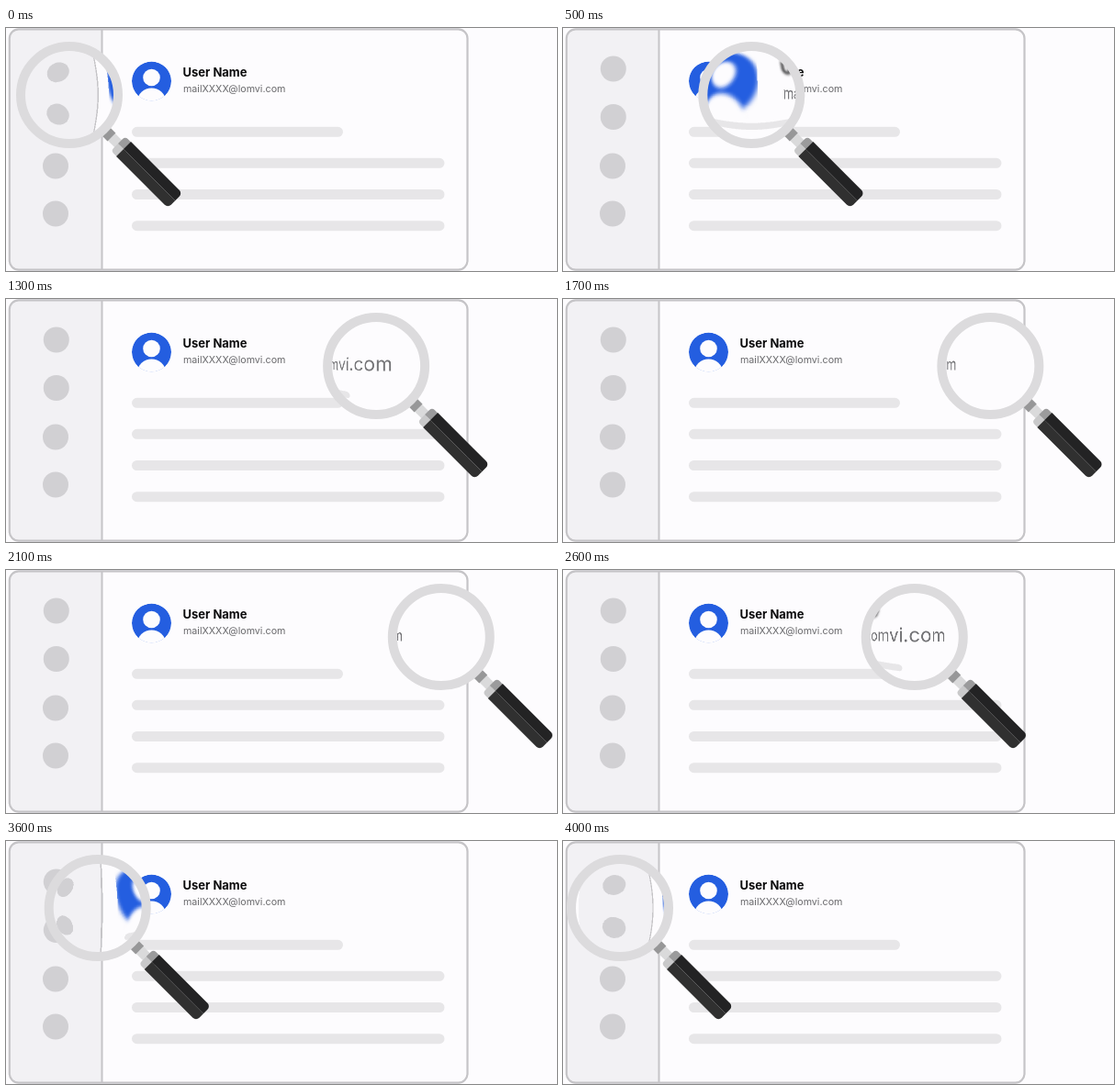
An HTML page with a canvas that plays this animation: 600x265 px, repeating every 5000 ms.

```html
<!DOCTYPE html>
<html lang="en">
<head>
<meta charset="utf-8">
<title>Magnifier over a profile card</title>
<style>
html, body { margin: 0; width: 100%; height: 100%; overflow: hidden; background: #fdfcfe; }
svg { position: absolute; left: 0; top: 0; width: 600px; height: 265px; }
canvas { position: absolute; left: 0; top: 23px; width: 100px; height: 100px; border-radius: 50%; }
text { font-family: Inter, "Open Sans", sans-serif; }
.name { font-weight: 700; font-size: 13px; fill: #0b0b0c; }
.mail { font-weight: 400; font-size: 10.7px; fill: #68686b; }
.dots { fill: #d1d0d3; }
.bars { stroke: #e7e6e8; stroke-width: 11; stroke-linecap: round; }
</style>
</head>
<body>
<svg viewBox="0 0 600 265">
  <defs><clipPath id="face"><circle cx="158.5" cy="58" r="21.5"/></clipPath></defs>
  <path d="M104.5 1.5H14a10 10 0 0 0-10 10v242a10 10 0 0 0 10 10h90.5z" fill="#f2f1f4"/>
  <path d="M104.5 1.5v262" stroke="#c5c4c7" stroke-width="2"/>
  <rect x="3.8" y="1.3" width="498.7" height="262.4" rx="10" fill="none" stroke="#c5c4c7" stroke-width="2.2"/>
  <g class="dots">
    <circle cx="54.8" cy="44.5" r="14"/><circle cx="54.8" cy="97" r="14"/>
    <circle cx="54" cy="150.5" r="14"/><circle cx="54" cy="202.5" r="14"/>
  </g>
  <path class="bars" d="M142.5 113.3H361.5M142.5 147.3H472M142.5 181.5H472M142.5 215.7H472"/>
  <g clip-path="url(#face)">
    <circle cx="158.5" cy="58" r="21.5" fill="#245ee0"/>
    <circle cx="158.5" cy="54" r="9.3" fill="#fdfcfe"/>
    <ellipse cx="158.5" cy="79" rx="15" ry="13.5" fill="#fdfcfe"/>
  </g>
  <text class="name" x="192.5" y="53.3">User Name</text>
  <text class="mail" x="193" y="70.3">mailXXXX@lomvi.com</text>
</svg>
<canvas id="glass" width="200" height="200"></canvas>
<svg viewBox="0 0 600 265">
  <g id="tool">
    <g transform="rotate(45)">
      <rect x="64" y="-5.5" width="14" height="11" fill="#dadadb"/>
      <rect x="56" y="-6.3" width="9" height="12.6" fill="#979798"/>
      <path d="M88 0V11H79a4 4 0 0 1-4-4V0z" fill="#c9c9ca"/>
      <path d="M88 0V-11H79a4 4 0 0 0-4 4V0z" fill="#9b9b9c"/>
      <path d="M83.5 0V11.3H158a5 5 0 0 0 5-5V0z" fill="#303030"/>
      <path d="M83.5 0V-11.3H158a5 5 0 0 1 5 5V0z" fill="#232324"/>
    </g>
    <circle r="53" fill="none" stroke="#dcdbdd" stroke-width="10"/>
  </g>
</svg>
<script>
const LOOP = 5000, STEP = 100, CY = 73, SIZE = 160, BEND = 1.4e-4;
const glass = document.getElementById('glass');
const tool = document.getElementById('tool');
const out = glass.getContext('2d');
const view = document.createElement('canvas');
view.width = view.height = SIZE * 2;
const g = view.getContext('2d', { willReadFrequently: true });

// time in tenths of a second, lens centre x, speed
const path = [[0, 69, 13], [3, 146, 31], [6, 233, 27], [12, 382, 22], [18, 474, 7], [19.4, 480, 0]];

function lensX(t) {
  if (t >= 40) return 62;
  if (t >= 19.4) return 271 + 209 * Math.cos((t - 19.4) / 20.6 * Math.PI);
  const i = path.findIndex(p => p[0] > t);
  const [t0, x0, v0] = path[i - 1], [t1, x1, v1] = path[i];
  const d = t1 - t0, s = (t - t0) / d, r = 1 - s;
  return (1 + 2 * s) * r * r * x0 + s * r * r * d * v0
       + s * s * (3 - 2 * s) * x1 - s * s * r * d * v1;
}

function box(x, y, w, h, color) {
  g.fillStyle = color;
  g.fillRect(x, y, w, h);
}

function oval(x, y, rx, ry, color) {
  g.fillStyle = color;
  g.beginPath();
  g.ellipse(x, y, rx, ry, 0, 0, 7);
  g.fill();
}

function write(str, x, y, font, color) {
  g.font = font + ' Inter, "Open Sans", sans-serif';
  g.fillStyle = color;
  g.fillText(str, x, y);
}

function clipped(x, y, w, h, paint) {
  g.save();
  g.beginPath();
  g.rect(x, y, w, h);
  g.clip();
  paint();
  g.restore();
}

// the enlarged card as the lens sees it, before bending
function drawView(cx) {
  g.setTransform(2, 0, 0, 2, 2 * (SIZE / 2 - cx), 2 * (SIZE / 2 - CY));
  box(cx - SIZE, CY - SIZE, SIZE * 2, SIZE * 2, '#fdfcfe');
  box(4, 1, 100, 263, '#f2f1f4');
  box(103.5, 1, 2, 263, '#c5c4c7');
  for (const y of [44.5, 97, 150.5]) oval(54.8, y, 14, 14, '#d1d0d3');
  g.fillStyle = '#e7e6e8';
  g.beginPath();
  g.roundRect(137, 107.8, 230, 11, 5.5);
  g.fill();

  clipped(123, 9, 89, 92, () => {
    g.filter = 'blur(6px)';
    oval(167, 54, 46, 44, '#245ee0');
    oval(167, 45, 19, 19, '#fdfcfe');
    oval(167, 98, 30, 27, '#fdfcfe');
  });

  const left = 192 + 52 * Math.exp((206 - cx) / 29);
  clipped(left - 3, 0, 300, 60, () => {
    g.filter = 'blur(5px)';
    write('User Name', left, 44, '700 26px', '#0b0b0c');
  });
  write('mailXXXX@lomvi.com', left, 78.5, '400 22px', '#747477');
}

function bend() {
  const side = SIZE * 2, n = glass.width;
  const from = new Uint32Array(g.getImageData(0, 0, side, side).data.buffer);
  const img = out.createImageData(n, n);
  const to = new Uint32Array(img.data.buffer);
  for (let j = 0; j < n; j++) {
    for (let i = 0; i < n; i++) {
      const x = (i + 0.5 - n / 2) / 2, y = (j + 0.5 - n / 2) / 2;
      const q = x * x + y * y;
      if (q > 2500) continue;
      const k = 2 * (1 + BEND * q);
      to[j * n + i] = from[Math.floor(SIZE + y * k) * side + Math.floor(SIZE + x * k)];
    }
  }
  out.putImageData(img, 0, 0);
}

let shown = -1;
function frame() {
  const step = Math.floor(performance.now() % LOOP / STEP);
  if (step !== shown) {
    shown = step;
    const cx = lensX(step);
    drawView(cx);
    bend();
    glass.style.transform = `translateX(${cx - 50}px)`;
    tool.setAttribute('transform', `translate(${cx} ${CY})`);
  }
  requestAnimationFrame(frame);
}
frame();
</script>
</body>
</html>
```
